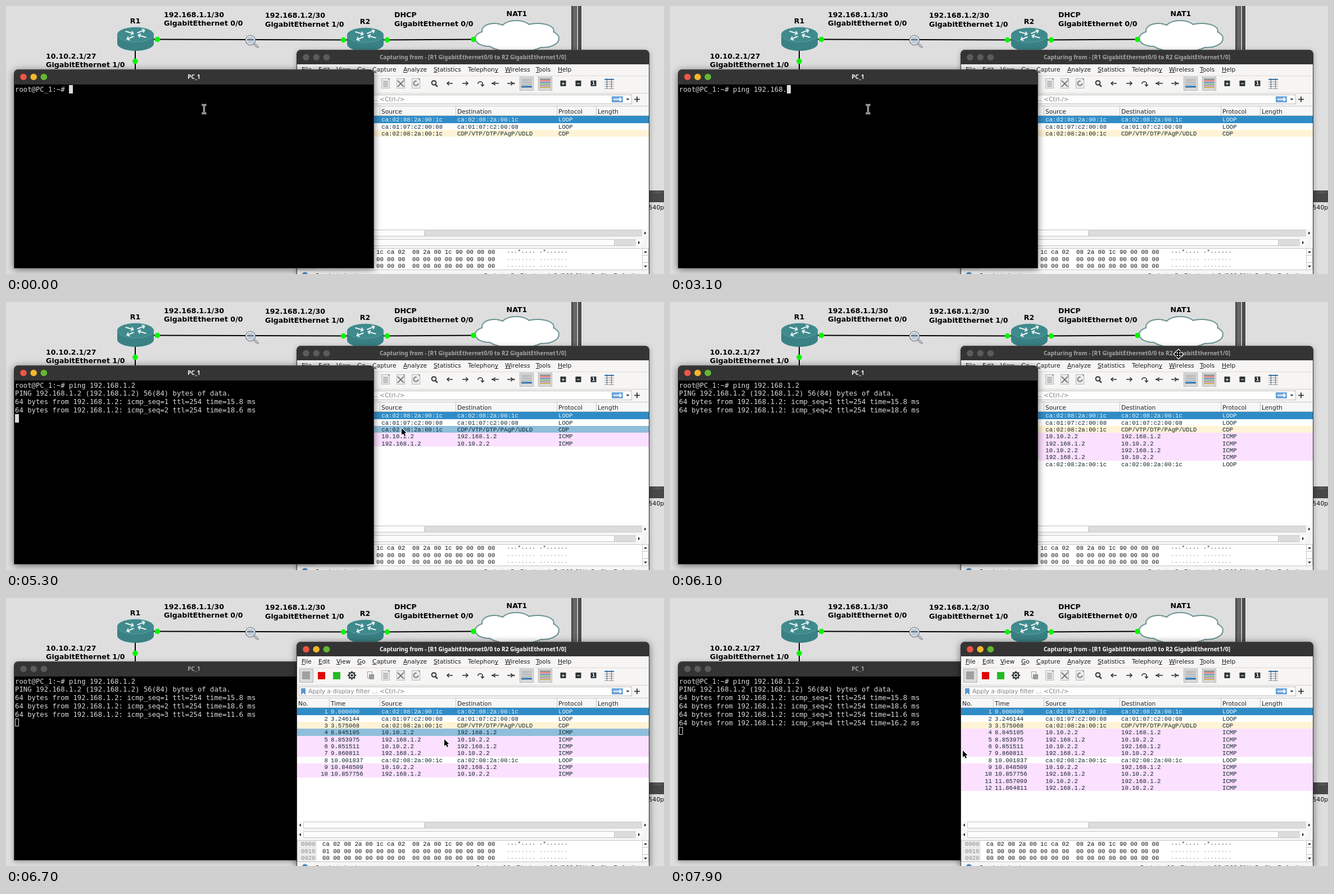
Recreate the animation shown at these times as an HTML page with a canvas. Size 1171x478 px, loop 8000 ms.

```html
<!DOCTYPE html>
<html lang="en">
<head>
<meta charset="utf-8">
<title>Ping capture</title>
<style>
html, body { margin: 0; width: 1171px; height: 478px; overflow: hidden; background: #dedede; }
canvas { display: block; }
</style>
</head>
<body>
<canvas id="stage" width="1171" height="478"></canvas>
<script>
const c = document.getElementById('stage').getContext('2d');
const SANS = '10.7px "DejaVu Sans", sans-serif';
const LABEL = 'bold 12.67px "DejaVu Sans", sans-serif';
const TITLE = 'bold 10.1px "Noto Sans", sans-serif';
const TERM = '12.27px "DejaVu Sans Mono", monospace';
const MONO = '10.68px "Liberation Mono", monospace';
const CELL = 7.387, LINE = 14.8, ROW = 12.35, RAISE = 6200;

const command = 'ping 192.168.1.2';
const keyTimes = [700, 900, 1100, 1200, 1400, 1700, 1900, 2100, 2300, 2400, 3100, 3100, 3100, 3500, 3800, 3900];
const replies = [[4200, '15.8'], [5200, '18.6'], [6200, '11.6'], [7200, '16.2']];

const macA = 'ca:02:08:2a:00:1c', macB = 'ca:01:07:c2:00:08';
const pc = '10.10.2.2', router = '192.168.1.2';
const packets = [
  [0, '0.000000', macA, macA, 'LOOP'],
  [0, '3.246144', macB, macB, 'LOOP'],
  [0, '3.575068', macA, 'CDP/VTP/DTP/PAgP/UDLD', 'CDP'],
  [4500, '8.845105', pc, router, 'ICMP'],
  [4500, '8.853975', router, pc, 'ICMP'],
  [5500, '9.851511', pc, router, 'ICMP'],
  [5500, '9.860811', router, pc, 'ICMP'],
  [5700, '10.001837', macA, macA, 'LOOP'],
  [6500, '10.848509', pc, router, 'ICMP'],
  [6500, '10.857756', router, pc, 'ICMP'],
  [7400, '11.857099', pc, router, 'ICMP'],
  [7400, '11.864811', router, pc, 'ICMP']
];
const rowFill = { LOOP: '#fff', CDP: '#fff3d6', ICMP: '#fce0ff' };

// Pointer path: time, x, y
const path = [[4700, 352, 184], [5100, 662, 219], [5300, 704, 225], [5600, 860, 127], [5800, 900, 95],
  [6100, 905, 92], [6300, 905, 92], [6500, 812, 228], [6700, 780, 252], [6900, 650, 240], [7200, 470, 185],
  [7400, 387, 169], [7600, 402, 200], [7800, 490, 258], [7900, 521, 272]];

function pointer(t) {
  if (t <= path[0][0]) return path[0].slice(1);
  const i = path.findIndex(p => p[0] >= t);
  const [t0, x0, y0] = path[i - 1], [t1, x1, y1] = path[i];
  const k = (t - t0) / (t1 - t0);
  return [x0 + (x1 - x0) * k, y0 + (y1 - y0) * k];
}

// y is the middle of the capitals
function text(s, x, y, font, color = '#000', align = 'left') {
  c.font = font;
  c.fillStyle = color;
  c.textAlign = align;
  c.fillText(s, x, y + parseFloat(font.match(/[\d.]+/)[0]) * 0.36);
}
function rect(x, y, w, h, fill, stroke) {
  if (fill) { c.fillStyle = fill; c.fillRect(x, y, w, h); }
  if (stroke) { c.lineWidth = 1; c.strokeStyle = stroke; c.strokeRect(x + .5, y + .5, w - 1, h - 1); }
}
function disc(x, y, r, fill) {
  c.beginPath();
  c.arc(x, y, r, 0, 7);
  c.fillStyle = fill;
  c.fill();
}
function line(color, width, ...p) {
  c.beginPath();
  for (let i = 0; i < p.length; i += 2) c.lineTo(p[i], p[i + 1]);
  c.strokeStyle = color;
  c.lineWidth = width;
  c.stroke();
}
function poly(fill, ...p) {
  c.beginPath();
  for (let i = 0; i < p.length; i += 2) c.lineTo(p[i], p[i + 1]);
  c.closePath();
  c.fillStyle = fill;
  c.fill();
}
function arrow(color, width, x0, y0, x1, y1, head) {
  const a = Math.atan2(y1 - y0, x1 - x0);
  const tip = d => [x1 - head * Math.cos(a + d), y1 - head * Math.sin(a + d)];
  line(color, width, x0, y0, x1, y1);
  line(color, width, ...tip(.75), x1, y1, ...tip(-.75));
}

function routerIcon(x, y) {
  c.fillStyle = '#398184';
  c.beginPath();
  c.ellipse(x, y + 16, 32.5, 13, 0, 0, Math.PI);
  c.ellipse(x, y, 32.5, 13, 0, Math.PI, 2 * Math.PI);
  c.fill();
  c.fillStyle = '#3f8a8c';
  c.beginPath();
  c.ellipse(x, y, 32.5, 13, 0, 0, 7);
  c.fill();
  c.strokeStyle = '#6aa3a5';
  c.lineWidth = .7;
  c.stroke();
  const white = '#eaf2f2';
  arrow(white, 2, x - 18, y - 6, x - 4, y - 2, 5);
  arrow(white, 2, x + 19, y + 5, x + 5, y + 1, 5);
  arrow(white, 2, x + 3, y - 3, x + 16, y - 8, 5);
  arrow(white, 2, x - 3, y + 3, x - 15, y + 8, 5);
}

function cloud() {
  const lobes = [[860, 58, 24, 13], [869, 44, 21, 12], [908, 41, 26, 14], [946, 44, 28, 12], [956, 58, 27, 15], [908, 63, 52, 18]];
  for (const fill of [false, true]) for (const [x, y, rx, ry] of lobes) {
    c.beginPath();
    c.ellipse(x, y, rx, ry, 0, 0, 7);
    c.fillStyle = '#fff';
    c.strokeStyle = '#6c9292';
    c.lineWidth = 4;
    fill ? c.fill() : c.stroke();
  }
}

function topology() {
  rect(0, 0, 1171, 478, '#dedede');
  rect(1006, 0, 18, 478, '#4b4b4b');
  rect(1009, 0, 6, 478, '#676767');
  rect(1016, 0, 2, 478, '#c4c4c4');
  rect(1024, 329, 147, 21, '#484848');
  for (let x = 1154; x < 1168; x += 3) { rect(x, 331, 1, 1, '#aaa'); rect(x, 333, 1, 1, '#888'); }
  text(':540p', 1171, 359, SANS, '#111', 'right');
  line('#000', 2, 262, 59.5, 608, 60.5);
  line('#000', 2, 670, 60.5, 836, 59.5);
  line('#000', 2, 230, 78, 230, 115);
  cloud();
  routerIcon(230.5, 51);
  routerIcon(639.5, 52);
  for (const [x, y] of [[269.5, 59.5], [600.5, 60.5], [678.5, 60.5], [832, 59.5], [230, 98.5]]) disc(x, y, 4.8, '#00f800');
  c.lineCap = 'round';
  line('#858b91', 4, 442, 68, 448, 73);
  line('#dfe5ee', 1.5, 442, 68, 448, 73);
  c.lineCap = 'butt';
  disc(435, 61, 9.3, '#757a7e');
  disc(435, 61, 8, '#eef0f2');
  disc(435, 61, 6.6, '#bccbdc');
  line('#444', 1.5, 429, 60, 441, 60.2);
  for (const [s, x, y] of [['192.168.1.1/30', 281, 15], ['GigabitEthernet 0/0', 281, 30.5],
    ['192.168.1.2/30', 461, 16.5], ['GigabitEthernet 1/0', 461, 32.5], ['DHCP', 691, 15.5],
    ['GigabitEthernet 0/0', 691, 31.5], ['10.10.2.1/27', 71, 89], ['GigabitEthernet 1/0', 71, 104.5]]) text(s, x, y, LABEL);
  for (const [s, x, y] of [['R1', 230, 26], ['R2', 639, 27], ['NAT1', 909, 13]]) text(s, x, y, LABEL, '#000', 'center');
}

function frame(x, y, w, h, bar, title, focus, fill) {
  c.save();
  c.shadowColor = focus ? 'rgba(0,0,0,.55)' : 'rgba(0,0,0,.35)';
  c.shadowBlur = focus ? 13 : 8;
  c.shadowOffsetY = 2;
  c.beginPath();
  c.roundRect(x, y, w, h, [8, 8, 0, 0]);
  c.fillStyle = '#343434';
  c.fill();
  c.restore();
  rect(x + 1, y + bar, w - 2, h - bar - 1, fill);
  line('#4b4b4b', 1, x + 8, y + .5, x + w - 8, y + .5);
  ['#ef5545', '#f3b72c', '#60b92f'].forEach((color, i) =>
    disc(x + 17 + i * 18.2, y + 13.5, 5.8, focus ? color : '#5b5b5b'));
  text(title, x + w / 2, y + 13, TITLE, focus ? '#fff' : '#a5a5a5', 'center');
}

function terminal(t) {
  const focus = t < RAISE;
  frame(14, 113, 641, 355, 27, 'PC_1', focus, '#000');
  const typed = keyTimes.filter(k => t >= k).length;
  const lines = ['root@PC_1:~# ' + command.slice(0, typed)];
  if (t >= 4200) lines.push('PING 192.168.1.2 (192.168.1.2) 56(84) bytes of data.');
  replies.forEach(([at, ms], i) => {
    if (t >= at) lines.push(`64 bytes from 192.168.1.2: icmp_seq=${i + 1} ttl=254 time=${ms} ms`);
  });
  lines.forEach((s, i) => text(s, 16, 148.2 + i * LINE, TERM, '#dadada'));
  const last = lines.length - 1;
  const col = last ? 0 : lines[0].length, row = last ? last + 1 : 0;
  const x = Math.round(16 + col * CELL), y = Math.round(141 + row * LINE);
  const hidden = t >= 100 && t < 600 || t >= 4800 && t < 5200 || t >= 5800;
  if (!focus) rect(x, y, 7, 14, null, '#dadada');
  else if (!hidden) rect(x, y, 7, 15, '#dadada');
}

function toolbar() {
  const ink = '#2e3436', faded = '#9a9a9a', y = 138;
  const pressed = x => rect(x - 12, 126, 25, 25, '#dcdcdc', '#b0b0b0');
  pressed(534);
  rect(527, 131, 14, 14, '#a0a0a0');
  rect(555, 132, 13, 13, '#e00606');
  rect(582, 132, 13, 13, '#22bb22');
  disc(615.5, y, 6, ink);
  for (let a = 0; a < 8; a++) {
    const dx = Math.cos(a * Math.PI / 4), dy = Math.sin(a * Math.PI / 4);
    line(ink, 2.5, 615.5 + 5 * dx, y + 5 * dy, 615.5 + 7.5 * dx, y + 7.5 * dy);
  }
  disc(615.5, y, 3.8, '#f6f5f4');
  disc(615.5, y, 2.2, ink);
  rect(643, 131, 9, 12, null, faded);
  rect(646, 136, 9, 9, faded);
  for (const x of [675.5, 702.5, 729.5]) {
    rect(x - 7.5, 129, 15, 18, '#efefef', '#b4b4b4');
    poly(faded, x + 3, 129, x + 7, 129, x + 7, 133);
  }
  for (let i = 0; i < 4; i++) line(faded, 1.5, 671, 134.5 + i * 3, 680, 134.5 + i * 3);
  line('#777', 2, 697, 133, 708, 144);
  line('#777', 2, 708, 133, 697, 144);
  c.beginPath();
  c.arc(729.5, y, 4, 0, 5);
  c.strokeStyle = '#777';
  c.lineWidth = 2;
  c.stroke();
  c.beginPath();
  c.arc(761.5, 137, 3.8, 0, 7);
  c.strokeStyle = ink;
  c.stroke();
  line(ink, 2.3, 764, 140, 768, 144);
  arrow(ink, 1.6, 795, y, 785, y, 5);
  arrow(ink, 1.6, 812, y, 822, y, 5);
  c.beginPath();
  c.arc(844, 139, 4, Math.PI, 0);
  c.stroke();
  arrow(ink, 1.6, 848, 138, 848, 143, 4);
  arrow(ink, 1.6, 877, y, 867, y, 5);
  disc(865.5, y, 1.5, ink);
  arrow(ink, 1.6, 892, y, 902, y, 5);
  disc(904, y, 1.5, ink);
  pressed(926);
  pressed(959);
  for (let i = 0; i < 6; i++) {
    line('#909090', 1, 917, 130.5 + i * 3, 936, 130.5 + i * 3);
    line(['#444', '#d33', '#36a', '#4a3', '#a5a', '#b90'][i], 1.3, 950, 130.5 + i * 3, 969, 130.5 + i * 3);
  }
  rect(917, 142, 19, 3, '#3a86c4');
  for (const [x, s] of [[991.5, '+'], [1018.5, '−'], [1045.5, '1']]) {
    rect(x - 5, 133, 10, 10, ink);
    text(s, x, 138, 'bold 8px "DejaVu Sans", sans-serif', '#fff', 'center');
  }
  for (let i = 0; i < 5; i++) line('#999', 1, 1065, 131.5 + i * 4, 1082, 131.5 + i * 4);
  for (const x of [1069.5, 1077.5]) line('#4a6a88', 1, x, 129, x, 147);
  rect(1065, 130, 17, 2, '#3a75a8');
}

function scrollRow(y, end, right) {
  rect(518, y, 626, 12, '#dcdcdc', '#cacaca');
  rect(518, y, 11, 12, '#fbfbfb');
  rect(right - 4, y, 1148 - right, 12, '#fbfbfb');
  rect(529, y, end - 529, 12, '#fdfdfd', '#c6c6c6');
  poly('#333', 525, y + 3, 525, y + 9, 521.5, y + 6);
  poly('#333', right, y + 3, right, y + 9, right + 3.5, y + 6);
}

function capture(t) {
  const paper = '#f6f5f4';
  frame(517, 78, 628, 404, 26, 'Capturing from - [R1 GigabitEthernet0/0 to R2 GigabitEthernet1/0]', t >= RAISE, paper);
  c.save();
  c.beginPath();
  c.rect(518, 104, 626, 374);
  c.clip();

  const menu = [['File', 526], ['Edit', 556], ['View', 588], ['Go', 625], ['Capture', 652], ['Analyze', 707],
    ['Statistics', 761], ['Telephony', 822], ['Wireless', 888], ['Tools', 943], ['Help', 982]];
  for (const [s, x] of menu) {
    text(s, x, 113, SANS, '#1a1a1a');
    const at = s === 'Telephony' ? 8 : 0;
    const from = x + c.measureText(s.slice(0, at)).width;
    line('#1a1a1a', 1, from, 118.5, from + c.measureText(s[at]).width, 118.5);
  }
  line('#dcdcdc', 1, 518, 124.5, 1144, 124.5);
  toolbar();
  line('#d2d2d2', 1, 518, 155.5, 1144, 155.5);

  rect(521, 158, 593, 17, '#fff', '#b9b9b9');
  poly('#5b94cf', 525, 161, 533, 161, 533, 173, 529, 169, 525, 173);
  text('Apply a display filter … <Ctrl-/>', 538, 166.5, SANS, '#808080');
  rect(1078, 161, 20, 11, '#6ea5d8');
  arrow('#fff', 2, 1081, 166.5, 1095, 166.5, 4.5);
  poly('#444', 1103.5, 165, 1109.5, 165, 1106.5, 168.5);
  line('#222', 1.6, 1118, 166.5, 1128, 166.5);
  line('#222', 1.6, 1123, 161.5, 1123, 171.5);

  rect(518, 179, 626, 219, '#fff');
  rect(518, 179, 626, 17, '#f7f7f7');
  line('#c6c6c6', 1, 518, 178.5, 1144, 178.5);
  line('#c6c6c6', 1, 518, 195.5, 1144, 195.5);
  [['No.', 520], ['Time', 578], ['Source', 668], ['Destination', 803], ['Protocol', 983], ['Length', 1053]].forEach(([s, x], i) => {
    text(s, x, 188, SANS, '#222');
    if (i) line('#c6c6c6', 1, x - 2.5, 179, x - 2.5, 196);
  });

  // The row highlight trails the pointer slightly
  const [px, py] = pointer(t - 100);
  const over = px > 517 && (t >= RAISE || px > 655) ? Math.floor((py - 196.2) / ROW) : -1;
  const shown = packets.filter(p => t >= p[0]);
  shown.forEach(([, time, src, dst, proto], i) => {
    const y = 196.2 + i * ROW, ink = i ? '#12272e' : '#e6f5ff';
    rect(518, Math.round(y), 626, Math.round(y + ROW) - Math.round(y),
      !i ? '#308cc6' : i === over ? '#8fbedb' : rowFill[proto]);
    const mid = y + 6.2;
    text(i + 1, 573, mid, MONO, ink, 'right');
    text(time, 578, mid, MONO, ink);
    text(src, 668.3, mid, MONO, ink);
    text(dst, 803, mid, MONO, ink);
    text(proto, 983, mid, MONO, ink);
  });

  scrollRow(399, 745, 1136);
  scrollRow(416, 1083, 1125);
  rect(1132, 416, 12, 12, paper);
  rect(518, 432, 626, 39, '#fff', '#c6c6c6');
  rect(519, 433, 34, 37, '#ececec');
  const zeros = n => Array(n).fill('00').join(' ');
  const hex = ['ca 02 08 2a 00 1c ca 02  08 2a 00 1c 90 00 00 00', '01 ' + zeros(7) + '  ' + zeros(8), zeros(8) + '  ' + zeros(8)];
  hex.forEach((s, i) => {
    const y = 438.5 + i * 12.4;
    text(`00${i}0`, 525, y, MONO, '#8a8a8a');
    text(s, 563, y, MONO, '#111');
    text(i ? '········ ········' : '···*···· ·*······', 891, y, MONO, i ? '#999' : '#444');
  });
  rect(1132, 432, 12, 39, '#fff', '#c6c6c6');
  rect(1132, 444, 12, 14, '#fdfdfd', '#c3c3c3');
  poly('#333', 1135, 440, 1141, 440, 1138, 436.5);
  poly('#333', 1135, 463, 1141, 463, 1138, 466.5);

  disc(532, 480, 5.5, '#4a88c0');
  const n = shown.length, ink = '#222', y = 480.8;
  text('Ready to load or capture', 551, y, SANS, ink);
  text(`Packets: ${n} · Displayed: ${n} (100.0%)`, 1034, y, SANS, ink, 'right');
  text('Profile: Default', 1041, y, SANS, ink);
  c.restore();
}

function drawPointer(t) {
  const [x, y] = pointer(t);
  const overTerminal = x < (t < RAISE ? 655 : 517) && y > 140;
  if (overTerminal) {
    for (const [color, w] of [['#fff', 3], ['#000', 1]]) {
      line(color, w, x - 3.5, y - 8, x - 1, y - 7.5, x + .5, y - 5, x + .5, y + 5, x - 1, y + 7.5, x - 3.5, y + 8);
      line(color, w, x + 4.5, y - 8, x + 2, y - 7.5, x + .5, y - 5, x + .5, y + 5, x + 2, y + 7.5, x + 4.5, y + 8);
    }
  } else if (y < 100 && t < RAISE) {
    for (const [color, w] of [['#fff', 4.5], ['#000', 2]])
      for (const [dx, dy] of [[1, 0], [-1, 0], [0, 1], [0, -1]]) arrow(color, w, x, y + 1, x + dx * 6.5, y + 1 + dy * 6.5, 3.5);
  } else {
    const shape = [0, 0, 0, 12, 2.8, 9.6, 5, 14, 7, 13, 5, 8.8, 8.6, 8.6].map((v, i) => v + (i % 2 ? y : x));
    line('#fff', 2.4, ...shape, x, y);
    poly('#000', ...shape);
  }
}

function draw(now) {
  const t = Math.floor(now % 8000 / 100) * 100;
  topology();
  const windows = [capture, terminal];
  if (t >= RAISE) windows.reverse();
  windows.forEach(w => w(t));
  drawPointer(t);
}

const start = performance.now();
(function tick() {
  draw(performance.now() - start);
  requestAnimationFrame(tick);
})();
</script>
</body>
</html>
```
